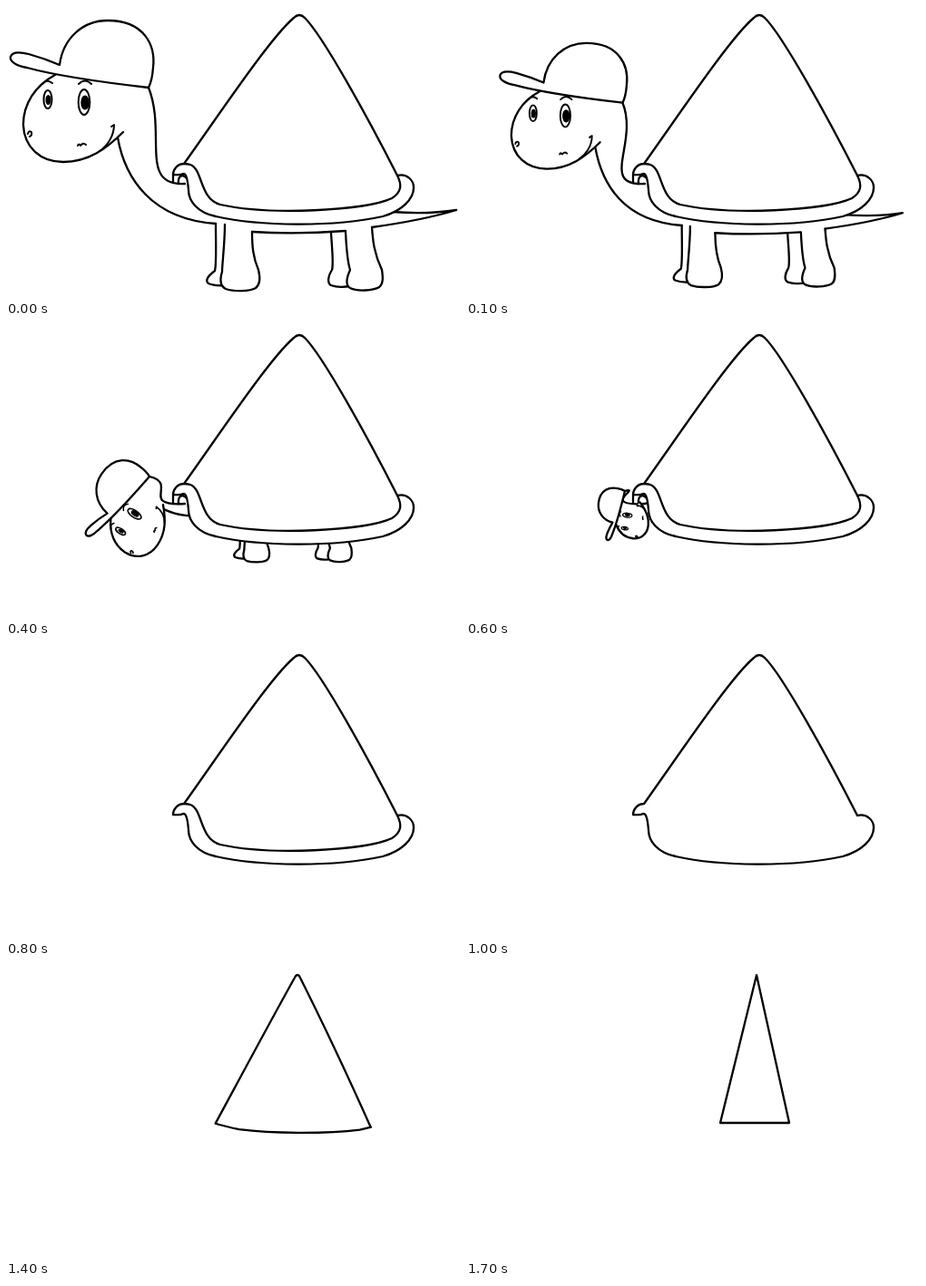
An HTML page that plays this animation: 500x322 px, repeating every 1800 ms.

```html
<!DOCTYPE html>
<html lang="en">
<head>
<meta charset="utf-8">
<title>Turtle to triangle</title>
<style>
html, body { margin: 0; width: 100%; height: 100%; overflow: hidden; background: #fff; }
svg { display: block; }
path, ellipse { vector-effect: non-scaling-stroke; }
.ink { fill: #000; stroke: none; }
.line { fill: none; }
</style>
</head>
<body>
<svg width="500" height="322" viewBox="0 0 500 322" fill="#fff" stroke="#000" stroke-width="2.3" stroke-linejoin="round" stroke-linecap="round">
  <g id="turtle">
    <g id="body">
      <path d="M425 227Q465 230 496 225Q460 236 403 244"/>
      <path d="M231 240C231 262 232 284 230 292C222 298 219 303 223 306Q230 309 242 308"/>
      <path d="M358 250C359 268 361 284 359 291C354 299 354 306 358 308Q366 311 379 309"/>
      <path d="M241 241C241 262 238 285 238 293C235 303 236 309 242 312C251 315 268 315 275 311C280 307 280 299 278 291C272 277 271 265 271 249"/>
      <path d="M374 249C375 270 377 285 379 291C374 302 374 308 379 311C387 315 404 314 411 310C416 306 415 298 414 291C405 272 404 258 403 244"/>
      <path class="line" d="M271 249Q320 252 374 248"/>
    </g>
    <path id="neck" class="line"/>
    <path class="line" d="M184 186V195M190 196C189 188 194 184 199 190"/>
    <g id="head">
      <path d="M54 76C32 88 19 108 19 131C20 156 38 172 63 172C91 172 111 157 129 139"/>
      <g id="face">
        <path class="line" d="M116 133L119 131C119 143 112 154 103 160M40 86Q45 80 51 85M80 86Q87 79 94 86M24 141Q25 137 28 139Q29 143 26 144M79 154Q80 151 82 154Q85 150 88 153"/>
        <ellipse cx="46" cy="103" rx="4.5" ry="10"/>
        <ellipse cx="86" cy="106" rx="6.3" ry="14"/>
        <ellipse class="ink" cx="46.5" cy="103.5" rx="3" ry="5.5"/>
        <ellipse class="ink" cx="87" cy="106.5" rx="4.7" ry="8"/>
      </g>
      <path d="M59 65C63 35 85 16 112 16C152 16 165 43 162 68Q161 82 157 90C105 84 56 77 23 68C11 66 4 61 5 56C7 50 17 51 25 53Q43 58 59 65Z"/>
    </g>
  </g>
  <path id="shell"/>
  <path id="rim" class="line" d="M431 187C436 197 436 205 425 212C395 226 290 231 236 219C213 213 217 180 203 175Q200 174 196 174"/>
</svg>
<script>
const el = id => document.getElementById(id);
const set = (id, name, value) => el(id).setAttribute(name, value);
const mix = (a, b, u) => a.map((v, i) => v + (b[i] - v) * u);

// Cap corner x, y, head scale and angle, one row per two steps
const headKeys = [[157, 90, 1, 0], [188, 123.4, .777, 0], [158, 166, .61, -55.5], [175, 182, .368, -83]];

const sides = [240, 112, 292, 34, 317, 13, 323, 7, 329, 13, 349, 33, 398, 122, 431, 187];
const rim = [442, 184, 449, 193, 449, 200, 449, 213, 436, 226, 415, 232,
  360, 244, 280, 243, 231, 232, 211, 228, 201, 215, 201, 203,
  200, 190, 198, 184, 195, 185, 192, 187, 188, 186, 184, 186,
  184, 180, 189, 174, 196, 174];

// Projects the rim onto a sagging line between two corners
function base(left, right, yLeft, yRight, sag) {
  return rim.map((v, i) => {
    const u = Math.min(1, Math.max(0, (rim[i - i % 2] - 195) / 237));
    return i % 2 ? yLeft + (yRight - yLeft) * u + sag * (1 - Math.abs(2 * u - 1) ** 2.5)
                 : left + (right - left) * u;
  });
}

function triangle(left, right) {
  const tip = [320, 10], a = [left, 173], b = [right, 173];
  return [...a, ...mix(a, tip, 1 / 3), ...mix(a, tip, 2 / 3), ...tip, ...tip, ...tip,
    ...mix(tip, b, 1 / 3), ...mix(tip, b, 2 / 3), ...b, ...base(left, right, 173, 173, 0)];
}

const bowl = [196, 174, ...sides, ...rim];
const cone = [195, 175, ...sides, ...base(195, 432, 175, 187, 30)];

function outline(step) {
  if (step <= 12) return mix(bowl, cone, Math.max(0, step - 10) / 2);
  const n = Math.max(3, step - 12);
  return mix(cone, triangle(201.25 + 15.75 * n, 433.5 - 15.5 * n), Math.min(1, (step - 12) / 3));
}

function drawTurtle(step) {
  const i = Math.min(Math.floor(step / 2), 2);
  const [x, y, s, angle] = mix(headKeys[i], headKeys[i + 1], step / 2 - i);
  const cos = s * Math.cos(angle * Math.PI / 180), sin = s * Math.sin(angle * Math.PI / 180);
  const onHead = (px, py) => [x + (px - 157) * cos - (py - 90) * sin, y + (px - 157) * sin + (py - 90) * cos];
  set("head", "transform", `translate(${x} ${y}) rotate(${angle}) scale(${s}) translate(-157 -90)`);
  set("face", "stroke-width", 1 + s);

  const k = Math.min(step, 6), size = 1 - .0825 * k;
  const dx = 312 * (1 - size), dy = 24.9 * k - 3.1 * k * k;
  const onBody = (px, py) => [px * size + dx, py * size + dy];
  set("body", "transform", `translate(${dx} ${dy}) scale(${size})`);

  set("neck", "d", `M${x} ${y}C${onHead(177, 140)} 146 199 197 196
    M${onHead(123, 145)}C${onHead(131, 190)} ${onBody(160, 235)} ${onBody(231, 240)}`);
}

function draw(step) {
  el("turtle").style.display = step < 8 ? "" : "none";
  el("rim").style.display = step < 10 ? "" : "none";
  const p = outline(step);
  set("shell", "d", `M${p.slice(0, 2)}C${p.slice(2, 8)}Q${p.slice(8, 12)}C${p.slice(12)}Z`);
  if (step < 8) drawTurtle(step);
}

const start = performance.now();
function tick() {
  draw(Math.floor((performance.now() - start) % 1800 / 100));
  requestAnimationFrame(tick);
}
tick();
</script>
</body>
</html>
```
